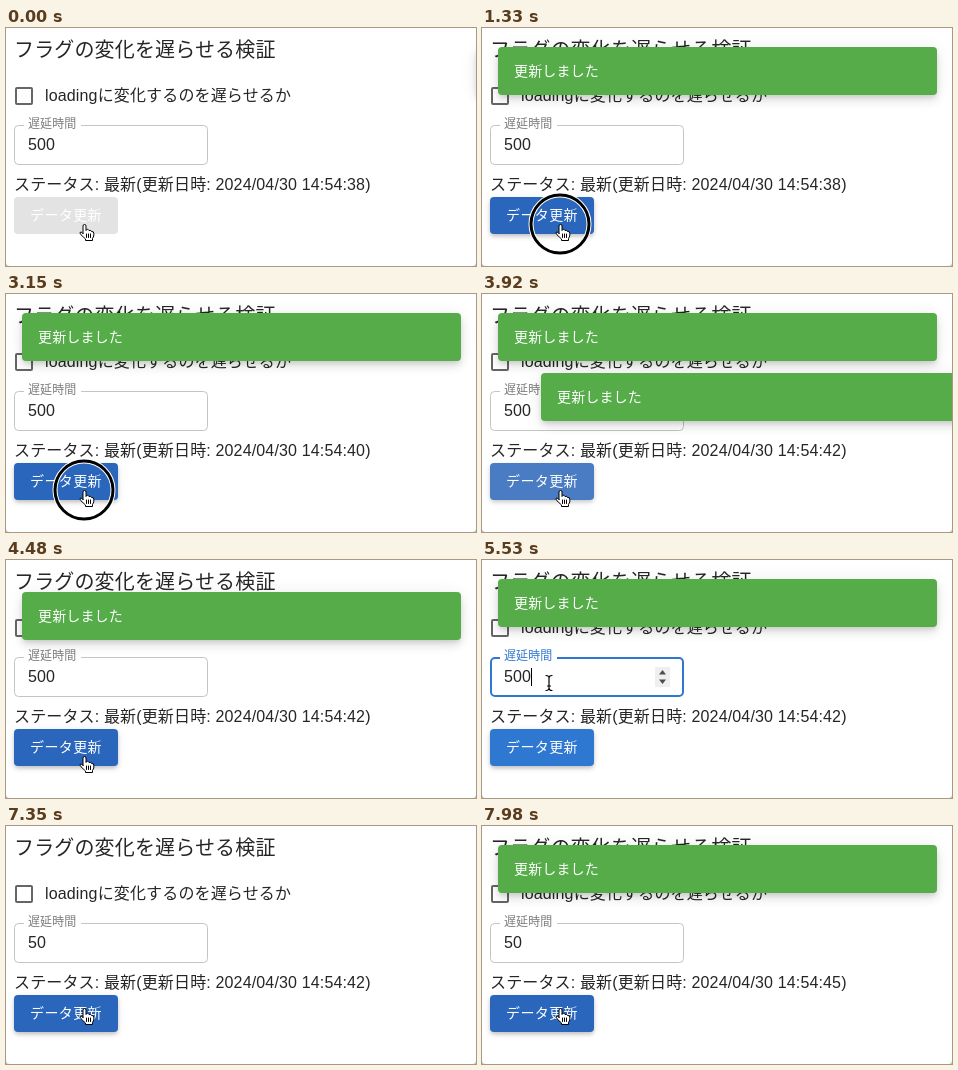
An HTML page for the animation above (8 s loop, 470 px wide and 238 px high).

```html
<!DOCTYPE html>
<html lang="ja">
<head>
<meta charset="utf-8">
<title>フラグの変化を遅らせる検証</title>
<style>
  html, body { margin: 0; width: 100%; height: 100%; overflow: hidden; background: #c4c4c4; }
  #stage {
    position: relative; width: 470px; height: 238px; overflow: hidden;
    background: #fff; border-radius: 0 0 4px 4px;
  }
  svg { position: absolute; left: 0; top: 0; overflow: visible; }
  text {
    font: 350 16px "Liberation Sans", "Noto Sans CJK JP", "Noto Sans CJK", sans-serif;
    letter-spacing: .15px; fill: #262626; white-space: pre;
  }
  #button { position: absolute; left: 8px; top: 169px; width: 104px; height: 37px; border-radius: 4px; }
  .toast {
    position: absolute; left: 0; top: 0; width: 439px; height: 48px;
    border-radius: 4px; background: #55ac49;
    box-shadow: 0 3px 5px -1px rgba(0,0,0,.12), 0 6px 10px rgba(0,0,0,.08), 0 1px 18px rgba(0,0,0,.07);
  }
  .toast text { font-size: 14px; fill: #fff; }
</style>
</head>
<body>
<div id="stage">
  <div id="button"></div>
  <svg width="470" height="238">
    <text x="8" y="29" style="font-size:20px">フラグの変化を遅らせる検証</text>
    <rect x="10" y="60" width="16" height="16" rx="1" fill="none" stroke="#666" stroke-width="2"/>
    <text x="39" y="73">loadingに変化するのを遅らせるか</text>

    <rect id="outline" rx="4" fill="none"/>
    <rect x="18" y="95" width="57" height="5" fill="#fff"/>
    <text id="label" x="22" y="100" style="font-size:12px;letter-spacing:.1px">遅延時間</text>
    <text id="value" x="22" y="122"></text>
    <rect id="caret" y="108" width="1" height="18" fill="#000"/>
    <g id="stepper">
      <rect x="173" y="107" width="15" height="20" fill="#efefef"/>
      <path d="M177 114.5L180.500 110L184 114.500ZM177 119.500L180.500 124L184 119.500Z" fill="#4d4d4d"/>
    </g>

    <text id="status" x="8" y="162"></text>
    <text id="caption" x="24" y="192" style="font-size:14px;letter-spacing:.4px;fill:#fff">データ更新</text>
    <circle id="spinner" cx="60" cy="187.500" r="7.300" fill="none" stroke="#a6a6a6" stroke-width="1.400"/>
  </svg>
  <div id="toasts"></div>
  <svg width="470" height="238">
    <g id="ring" fill="none">
      <circle r="29" stroke="#fff" stroke-width="5"/>
      <circle r="29" stroke="#000" stroke-width="3"/>
    </g>
    <g id="pointer" stroke-linejoin="round" stroke-linecap="round">
      <path data-kind="hand" fill="#fff" stroke="#000"
        d="M-1 8.500V1Q-1-.5 .5-.5T2 1V5.500Q2.500 4.300 3.500 4.300T5 5.500Q7.300 4.800 7.500 6.500Q9.800 6.200 9.800 8.200V11L8.500 13.500V15.500H1.500V14L-3 9.800Q-4.800 7.700-3.500 7Q-2.300 6.700-1 8.500ZM2.500 9V12.500M4.500 9V12.500M6.500 9V12.500"/>
      <path data-kind="arrow" fill="#000" stroke="#fff"
        d="M0 0V14.500L3.300 11.500L5.500 16.500L8 15.400L5.900 10.600H10.500Z"/>
      <g data-kind="beam" fill="none">
        <path stroke="#fff" stroke-width="2.500" d="M-3-7.500Q0-7.500 0-5Q0-7.500 3-7.500M0-5V5M-3 7.500Q0 7.500 0 5Q0 7.500 3 7.500M-1.500 3H1.500"/>
        <path stroke="#000" stroke-width="1.200" d="M-3-7.500Q0-7.500 0-5Q0-7.500 3-7.500M0-5V5M-3 7.500Q0 7.500 0 5Q0 7.500 3 7.500M-1.500 3H1.500"/>
      </g>
    </g>
  </svg>
</div>
<script>
const LOOP = 8000, TICK = 70;
const $ = id => document.getElementById(id);
const show = (el, on) => el.setAttribute('visibility', on ? 'visible' : 'hidden');
const attrs = (el, map) => { for (const key in map) el.setAttribute(key, map[key]); };
const clamp = v => Math.min(1, Math.max(0, v));
const mix = (a, b, k) => a + (b - a) * k;
const within = (t, [from, to]) => t >= from && t < to;

// cubic-bezier(x1, 0, x2, 1)
const bezier = (x1, x2) => x => {
  if (x <= 0 || x >= 1) return clamp(x);
  let lo = 0, hi = 1;
  for (let i = 0; i < 24; i++) {
    const s = (lo + hi) / 2, r = 1 - s;
    if (3 * s * r * r * x1 + 3 * s * s * r * x2 + s ** 3 < x) lo = s; else hi = s;
  }
  return lo * lo * (3 - 2 * lo);
};
const standard = bezier(.4, .2), easeOut = bezier(0, .2), sharp = bezier(.4, .6);
const tween = (t, start, length, ease) => ease(clamp((t - start) / length));

// last entry whose time has come
const latest = (list, t) => list.filter(item => item[0] <= t).pop();

const toasts = [
  { enter: 0, leave: 2105 },
  { enter: 1964, leave: 4120, rise: 2432 },
  { enter: 3784, leave: 5940, rise: 4392 },
  { enter: 7600, leave: Infinity }
];
const loading = [[1460, 1964], [3280, 3784], [7565, 7600]];
const seconds = [[0, 38], [1964, 40], [3784, 42], [7600, 45]];
const focus = [5110, 6790];
const carets = [[5110, 5810], [5950, 6370]];
const presses = [[1330, 1460], [3150, 3280], [5110, 5250], [6790, 6930], [7420, 7565]];

// red, green, blue, shadow strength
const IDLE = [47, 120, 210, 1], HOVER = [41, 102, 188, 1], DISABLED = [227, 227, 227, 0];
const buttonStates = [
  [0, HOVER], [1460, DISABLED], [1964, HOVER], [3280, DISABLED], [3784, HOVER],
  [4870, IDLE], [7070, HOVER], [7565, DISABLED], [7600, HOVER]
];
const route = [
  [0, 78, 197], [4760, 78, 197], [5110, 179, 97], [5250, 179, 97], [5530, 67, 123],
  [6440, 67, 123], [6650, 76, 145], [6790, 76, 145], [6930, 76, 145], [7280, 78, 183], [8000, 78, 183]
];
const pointers = [
  [0, 'hand'], [1460, 'arrow'], [1964, 'hand'], [3280, 'arrow'], [3784, 'hand'],
  [4900, 'arrow'], [5060, 'beam'], [5950, 'none'], [6510, 'arrow'], [7000, 'hand']
];

for (const toast of toasts) {
  toast.el = document.createElement('div');
  toast.el.className = 'toast';
  toast.el.innerHTML = '<svg width="439" height="48"><text x="16" y="29">更新しました</text></svg>';
  $('toasts').append(toast.el);
}

function drawToast({ el, enter, leave, rise }, t) {
  const away = 1 - tween(t, enter, 225, easeOut) + tween(t, leave, 195, sharp);
  const y = rise ? mix(79, 19, tween(t, rise, 175, standard)) : 19;
  el.style.display = t >= enter && t < leave + 195 ? 'block' : 'none';
  el.style.transform = `translate(${Math.round(16 + 454 * away)}px, ${Math.round(y)}px)`;
}

function drawButton(t, busy) {
  let look = DISABLED;
  buttonStates.forEach(([start, goal], i) => {
    if (start > t) return;
    const until = Math.min(t, buttonStates[i + 1]?.[0] ?? t);
    const k = tween(until, start, 250, standard);
    look = look.map((v, j) => mix(v, goal[j], k));
  });
  const [r, g, b, lift] = look;
  const shade = a => `rgba(0,0,0,${a * lift})`;
  $('button').style.background = `rgb(${r},${g},${b})`;
  $('button').style.boxShadow =
    `0 2px 4px -1px ${shade(.14)}, 0 3px 4px ${shade(.1)}, 0 1px 8px ${shade(.08)}`;
  show($('caption'), !busy);
  show($('spinner'), busy);
  const arc = 18 - 14 * Math.cos(t / 1400 * 2 * Math.PI);
  attrs($('spinner'), {
    'stroke-dasharray': `${arc} 60`,
    transform: `rotate(${t / 1400 * 360 - 90} 60 187.5)`
  });
}

function drawField(t) {
  const focused = within(t, focus);
  const short = t >= 5950;
  const inset = focused ? 1 : .5;
  attrs($('outline'), {
    x: 8 + inset, y: 97 + inset, width: 194 - 2 * inset, height: 40 - 2 * inset,
    stroke: focused ? '#2f78d2' : '#c4c4c4', 'stroke-width': 2 * inset
  });
  $('label').style.fill = focused ? '#2f78d2' : '#7c7c7c';
  $('value').textContent = short ? '50' : '500';
  $('caret').setAttribute('x', short ? 40 : 49);
  show($('caret'), carets.some(span => within(t, span)));
  show($('stepper'), focused);
}

function drawPointer(t) {
  const next = route.findIndex(point => point[0] > t);
  const [t0, x0, y0] = route[next - 1], [t1, x1, y1] = route[next];
  const k = (t - t0) / (t1 - t0), x = mix(x0, x1, k), y = mix(y0, y1, k);
  const kind = latest(pointers, t)[1];
  $('pointer').setAttribute('transform', `translate(${x} ${y})`);
  for (const shape of $('pointer').children) show(shape, shape.dataset.kind === kind);
  $('ring').setAttribute('transform', `translate(${x} ${y - 1})`);
  show($('ring'), presses.some(span => within(t, span)));
}

function render(t) {
  const busy = loading.some(span => within(t, span));
  $('status').textContent =
    `ステータス: ${busy ? '更新中' : '最新'}(更新日時: 2024/04/30 14:54:${latest(seconds, t)[1]})`;
  drawField(t);
  drawButton(t, busy);
  toasts.forEach(toast => drawToast(toast, t));
  drawPointer(t);
}

const origin = performance.now();
function frame() {
  const t = (performance.now() - origin) % LOOP;
  render(Math.floor(t / TICK) * TICK);
  requestAnimationFrame(frame);
}
frame();
</script>
</body>
</html>
```
